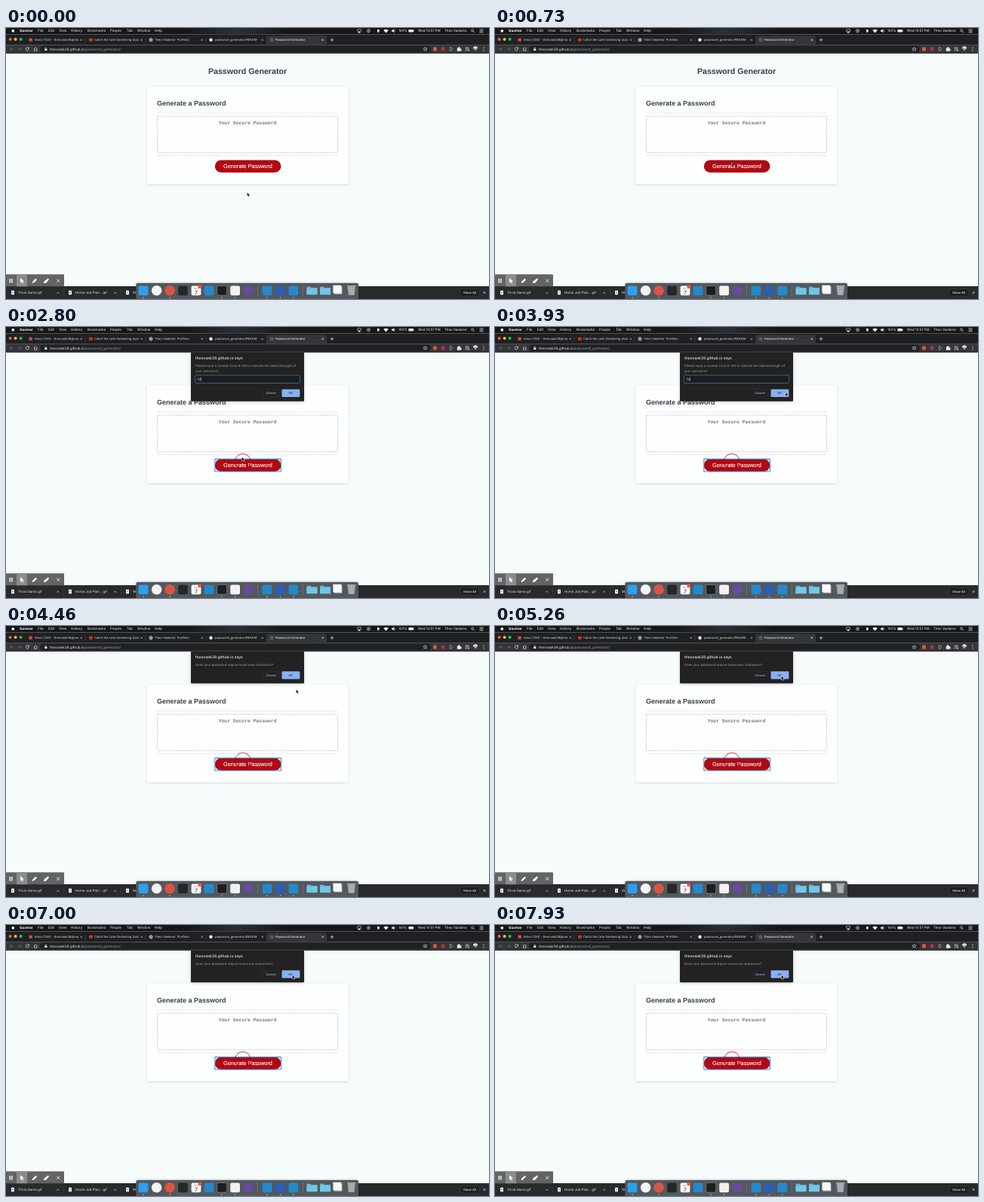
Recreate the animation shown at these times as an HTML page. Size 640 px wide and 360 px high, loop 8000 ms.

```html
<!DOCTYPE html>
<html lang="en">
<head>
<meta charset="utf-8">
<title>Password Generator</title>
<style>
  html, body { margin: 0; width: 100%; height: 100%; overflow: hidden; background: #f6fbfc; }
  svg { display: block; width: 640px; height: 360px; }
  text { font-family: Inter, "Liberation Sans", sans-serif; text-rendering: geometricPrecision; }
  .page { font-family: "Liberation Sans", Arial, sans-serif; }
  .mono { font-family: "Liberation Mono", "Courier New", monospace; }
  #ring { mix-blend-mode: multiply; }
</style>
</head>
<body>
<svg id="stage" viewBox="0 0 640 360" xmlns="http://www.w3.org/2000/svg"></svg>
<script>
const LOOP = 8000;
const USER = "theovask38";
const HOST = USER + ".github.io";
const OWNER = "Theo Vaskens";
const LIGHT = "#e8eaed", DIM = "#9aa0a6", FADED = "#72757a", SLATE = "#333e46";

const rect = (x, y, w, h, fill, r = 0, extra = "") =>
  `<rect x="${x}" y="${y}" width="${w}" height="${h}" rx="${r}" fill="${fill}" ${extra}/>`;
const dot = (x, y, r, fill, extra = "") =>
  `<circle cx="${x}" cy="${y}" r="${r}" fill="${fill}" ${extra}/>`;
const line = (d, color, w = 0.7, extra = "") =>
  `<path d="${d}" fill="none" stroke="${color}" stroke-width="${w}" ${extra}/>`;
const shape = (d, fill, extra = "") => `<path d="${d}" fill="${fill}" ${extra}/>`;
const text = (x, y, size, fill, str, extra = "") =>
  `<text x="${x}" y="${y}" font-size="${size}" fill="${fill}" ${extra}>${str}</text>`;
const cross = (x, y, r, color, w) =>
  line(`M${x - r} ${y - r}l${2 * r} ${2 * r}m0 ${-2 * r}l${-2 * r} ${2 * r}`, color, w);
const globe = (x, y, color) =>
  dot(x, y, 2.1, "none", `stroke="${color}" stroke-width=".7"`) +
  line(`M${x - 2} ${y}h4M${x} ${y - 2}v4`, color, 0.6);
const MIDDLE = 'text-anchor="middle"', BOLD = 'font-weight="700"', MEDIUM = 'font-weight="500"';

function menuBar() {
  const items = [["File", 42], ["Edit", 56], ["View", 70], ["History", 86], ["Bookmarks", 108],
    ["People", 138], ["Tab", 160], ["Window", 174], ["Help", 197]];
  return rect(0, 0, 640, 8.5, "#171718") + rect(240, 0, 130, 8.5, "url(#glow)") +
    dot(9.3, 3.8, 1.9, "#f0f0f0") +
    text(18, 5.4, 4.5, "#fff", "Quomar", BOLD) +
    items.map(([s, x]) => text(x, 5.4, 4.55, "#f2f2f2", s)).join("") +
    rect(465.6, 1.8, 5, 3.2, "none", 0.5, 'stroke="#e6e6e6" stroke-width=".6"') + shape("M468.1 4l1.7 2.4h-3.4z", "#e6e6e6") +
    dot(480.5, 3.8, 2, "none", 'stroke="#e6e6e6" stroke-width=".7"') + dot(480.5, 3.8, 0.8, "#e6e6e6") +
    rect(492, 2, 2.6, 3.6, "#e6e6e6") +
    shape("M503.5 6.4l-3.3 -3.4q3.3 -2.6 6.6 0z", "#f2f2f2") +
    shape("M511 2.8h1.5l1.8 -1.5v5l-1.8 -1.5h-1.5z", "#f2f2f2") +
    line("M515.4 2.4q1 1.4 0 2.8", "#f2f2f2", 0.5) +
    text(520, 5.4, 4.35, "#f2f2f2", "100%") +
    rect(533.4, 2, 6.4, 3.6, "#f2f2f2", 0.8) + rect(540.2, 3.1, 0.7, 1.4, "#f2f2f2") +
    text(546, 5.4, 4.5, "#f2f2f2", "Wed 10:51 PM") +
    text(581, 5.4, 4.45, "#f2f2f2", OWNER) +
    dot(618, 3.3, 1.5, "none", 'stroke="#f2f2f2" stroke-width=".6"') + line("M619.1 4.4l1.6 1.7", "#f2f2f2") +
    line("M627.5 2h5M627.5 3.9h5M627.5 5.8h5", "#f2f2f2", 0.7);
}

function tabStrip() {
  const titles = [`Inbox (124) - ${USER}@ma`, "Catch the Late Gardening Quiz", `${OWNER}' Portfolio`,
    "password_generator/READM", "Password Generator"];
  const icons = [rect(30.5, 13.7, 4.4, 4, "#d94a3d"), rect(110, 13.7, 4.8, 4, "#e02a20", 0.8), globe(192, 15.8, "#fff"),
    dot(271.5, 15.8, 2.2, "#f0f0f0"), globe(352, 15.8, FADED)];
  const starts = [38, 117, 197, 277, 357];
  let out = rect(0, 8.5, 640, 14, "#1f2023") +
    shape("M343 22.5q2 0 2 -2v-7.5q0 -2.5 2.5 -2.5h75q2.5 0 2.5 2.5v7.5q0 2 2 2z", "#35363a");
  ["#f25f57", "#f6bd2f", "#2ac640"].forEach((c, i) => out += dot(5.6 + i * 7, 15, 2, c));
  titles.forEach((s, i) => {
    const x = 25 + i * 80, on = i === 4;
    out += `<clipPath id="tab${i}"><rect x="${x}" y="9" width="71.5" height="13"/></clipPath>` + icons[i] +
      text(starts[i], 17.4, 4.1, on ? "#fff" : "#d5d8dc", s, `clip-path="url(#tab${i})"`) +
      cross(x + 74.7, 15.8, 1.2, on ? "#fff" : "#c4c7cb", 0.6);
    if (i < 3) out += line(`M${x + 80} 13v6`, "#55585c", 0.5);
  });
  return out + line("M429.8 15.8h4.4M432 13.6v4.4", LIGHT, 0.7);
}

function toolbar() {
  return rect(0, 22.3, 640, 11.7, "#35363a") +
    rect(45, 23.6, 518, 8.6, "#202124", 4.3) +
    line("M10 28h-4.4m2 -2l-2 2l2 2M16 28h4.4m-2 -2l2 2l-2 2", FADED) +
    line("M30 26.6a2 2 0 1 0 .3 1.8", LIGHT) + shape("M30.9 25.4v2.2h-2.2z", LIGHT) +
    line("M36.9 28l2.3 -2l2.3 2M37.6 27.6v2.6h3.2v-2.6", LIGHT) +
    rect(51.2, 27.4, 3.2, 2.6, LIGHT, 0.3) + line("M51.9 27.5v-.8a.9 .9 0 0 1 1.8 0v.8", LIGHT, 0.5) +
    text(58, 29.6, 4.65, DIM, `<tspan fill="${LIGHT}">${HOST}</tspan>/password_generator/`) +
    line("M555.5 25.4l.8 1.7h1.9l-1.5 1.2l.5 1.9l-1.7 -1.1l-1.7 1.1l.5 -1.9l-1.5 -1.2h1.9z", LIGHT, 0.6) +
    rect(566, 25.6, 4.8, 4.8, "#e0583a", 0.8) +
    rect(576.8, 25.6, 4.6, 4.6, "#b5343c", 0.8) +
    line("M588.3 25.7h1.6l2 2.2l-2 2.2h-1.6z", "#b9c4c2") +
    shape("M597.8 26.6h1.4q-.2 -1.5 1 -1.5t1 1.5h1.4v1.4q1.3 0 1.3 .9t-1.3 .9v1h-4.8z", LIGHT) +
    line("M608.6 26h5M608.6 27.8h5M608.6 29.6h2.6", LIGHT) + dot(613, 29.6, 0.9, LIGHT) +
    dot(622, 28, 3.1, "#30353a") + shape("M618.9 27.4a3.1 3.1 0 0 1 6.2 0z", "#dfe3e5") + rect(620.5, 27.4, 3, 2.4, "#a9adb0", 1) +
    [25.9, 28, 30.1].map(y => dot(633, y, 0.6, LIGHT)).join("");
}

function page() {
  return rect(0, 34, 640, 310, "#f6fbfc") +
    text(320, 61, 10.67, SLATE, "Password Generator", `class="page" ${MIDDLE} ${BOLD}`) +
    rect(186.5, 77.8, 267, 129.6, "#fdfefe", 2, 'filter="url(#shadow)"') +
    text(200, 103.1, 9, SLATE, "Generate a Password", `class="page" ${BOLD}`) +
    line("M200 112.8h240M200 169.6h240", "#dfe4e6", 0.7) +
    rect(200.4, 117.2, 239.2, 48.5, "none", 1, 'stroke="#aeb6ba" stroke-width=".7" stroke-dasharray="2 1.3"') +
    text(320, 128.3, 6.4, "#74787a", "Your Secure Password", `class="mono" ${MIDDLE} ${BOLD}`) +
    rect(276.8, 175.4, 87.6, 16.6, "#b00912", 8.3) +
    text(320.5, 186.2, 7.35, "#fff", "Generate Password", `class="page" ${MIDDLE} stroke="#fff" stroke-width=".12"`) +
    `<g id="focus">${rect(276.8, 175.4, 87.6, 16.6, "none", 0.6, 'stroke="#3a89d6" stroke-width="1.1"')}</g>` +
    '<circle id="ring" cx="313.8" cy="178.6" fill="none" stroke="#ee7075" stroke-width="1.1"/>';
}

function buttons(y) {
  return rect(340.5, y, 21, 10.3, "none", 1.3, 'stroke="#2f3136" stroke-width=".6"') +
    text(351, y + 6.5, 4, "#9cc0fa", "Cancel", `${MIDDLE} ${MEDIUM}`) +
    rect(365.5, y, 23.9, 10.3, "#8ab0f4", 1.3) +
    text(377.2, y + 6.5, 4, "#202a3c", "OK", `${MIDDLE} ${MEDIUM}`);
}

function dialog(id, height, lines, field = "") {
  return `<g id="${id}">` +
    rect(245, 33.5, 150, height, "#202124", 1, 'filter="url(#soft)"') +
    text(251, 43.2, 5, LIGHT, HOST + " says", MEDIUM) +
    lines.map((s, i) => text(251, 53 + i * 6.8, 4.25, DIM, s, i ? "" : `id="${id}Msg"`)).join("") +
    field + buttons(height + 33.5 - 16) + "</g>";
}

function dialogs() {
  const field = rect(250.6, 64.1, 138.8, 10.4, "#1b1c1f", 0.8, 'stroke="#3d7b99" stroke-width=".75"') +
    text(253.2, 71, 4.25, LIGHT, "", 'id="typed"') + rect(0, 66.8, 0.5, 5, LIGHT, 0, 'id="caret"');
  return dialog("prompt", 65.3,
      ["Please input a number from 8-128 to indicate the desired length of", "your password."], field) +
    dialog("confirm", 42.8, [""]);
}

function recorder() {
  return rect(-2, 327.2, 79, 16, "#636465", 1) + rect(14, 327.6, 14, 15.6, "#8b8c8d") +
    rect(4.6, 333, 1.4, 5.6, "#fff") + rect(7.2, 333, 1.4, 5.6, "#fff") +
    shape("M19 332.2l5 4.4l-2.2 .2l1.3 2.4l-1 .5l-1.2 -2.4l-1.9 1.5z", "#fff") +
    shape("M34.6 339l.5 -2l4.3 -4.2l1.6 1.6l-4.3 4.2z", "#fff") +
    shape("M50 338.8q0 -3 3 -4l2.8 -2.2l1.2 1.5l-2.4 2.9q-1.6 2.4 -4.6 1.8z", "#fff") +
    cross(69.3, 335.8, 2.1, "#fff", 0.8);
}

function downloads() {
  const names = ["Trivia Game.gif", "Home Job Plan....gif", "Word List.gif"];
  let out = rect(0, 343, 640, 17, "#292a2d");
  names.forEach((s, i) => {
    const x = i * 76;
    out += rect(x + 7, 348.8, 4, 5.4, "#f1f3f4", 0.4) + rect(x + 8, 350.6, 2, 1.7, "#7f9fc8") +
      text(x + 16, 353.2, 4.4, LIGHT, s) +
      line(`M${x + 67.2} 352.6l1.6 -1.6l1.6 1.6`, LIGHT) + line(`M${x + 76.3} 347v9.5`, "#4a4c50", 0.5);
  });
  return out + rect(602, 346.6, 25, 9.8, "#1f2023", 1.2, 'stroke="#404247" stroke-width=".5"') +
    text(614.5, 353.1, 4.1, LIGHT, "Show All", `${MIDDLE} ${MEDIUM}`) + cross(634, 351.5, 1.4, LIGHT, 0.7);
}

function dock() {
  const app = (x, c) => rect(x - 6.4, 342.4, 12.8, 12.8, c, 2.2);
  const disc = (x, c) => dot(x, 348.8, 6.8, c);
  const folder = x => shape(`M${x - 7} 343.8h5l1.2 1.3h7.8v9h-14z`, "#62b8dc") + rect(x - 7, 346.2, 14, 8, "#74c6e6", 0.7);
  return rect(172.3, 338.8, 294.7, 24, "#53595d", 2.5, 'filter="url(#soft)"') +
    app(182, "#2c9ff0") + disc(199.6, "#f4f3f6") + disc(217, "#dc5443") + app(234.5, "#25272b") +
    app(252, "#f8f8f8") + text(252, 347, 2.8, "#df3a32", "OCT", MIDDLE) + text(252, 353.8, 7, "#333", "7", MIDDLE) +
    dot(257, 343.6, 2.5, "#f03c34") + text(257, 344.8, 3.2, "#fff", "1", MIDDLE) +
    app(269, "#2489ca") +
    rect(279.8, 342.5, 12.8, 12.6, "#1d1e20", 2, 'stroke="#9a9da0" stroke-width=".5"') +
    app(303.6, "#f3f1f4") + disc(321, "#6a4a9c") +
    app(346, "#2489ca") + app(363.4, "#2c5fb4") + app(380.8, "#2489ca") +
    line("M333.5 342v14M393.3 342v14", "#7d8386", 0.6) +
    folder(405.5) + folder(423) +
    rect(434.5, 343.2, 10.8, 10.2, "#d5d9dc", 0.5) + rect(433.4, 341.8, 10.8, 10.2, "#f8f9f9", 0.5) +
    shape("M452.3 342.5h10.8l-1.3 12.6h-8.2z", "#a9afb2", 'opacity=".8"') +
    line("M452 342.6h11.4M455.2 344l.6 10M457.7 344v10M460.2 344l-.6 10", "#d6dadc", 0.6) +
    [182, 217, 286, 303.6, 346, 363.4, 380.8].map(x => dot(x, 358.2, 0.65, "#e2e4e5")).join("");
}

const shadow = (id, dy, blur, alpha) =>
  `<filter id="${id}" x="-10%" y="-30%" width="120%" height="160%">` +
  `<feDropShadow dx="0" dy="${dy}" stdDeviation="${blur}" flood-opacity="${alpha}"/></filter>`;
const defs = "<defs>" + shadow("shadow", 0.7, 1.3, 0.2) + shadow("soft", 0.8, 2, 0.18) +
  '<linearGradient id="glow"><stop stop-color="#2b3036" stop-opacity="0"/><stop offset=".5" stop-color="#2b3036"/>' +
  '<stop offset="1" stop-color="#2b3036" stop-opacity="0"/></linearGradient></defs>';

const cursor = '<path id="cursor" d="M0 0v5.2l1.3 -1.1l.9 2l1 -.45l-.9 -1.95h1.6z" fill="#000" stroke="#fff" stroke-width=".45" stroke-linejoin="round"/>';

document.getElementById("stage").innerHTML = defs +
  page() + dialogs() + menuBar() + tabStrip() + toolbar() + downloads() + recorder() + dock() + cursor;

const $ = id => document.getElementById(id);
const show = (id, on) => $(id).setAttribute("visibility", on ? "visible" : "hidden");

// Cursor stops: time, x, y
const path = [[0, 319.5, 218.5], [350, 319.5, 218.5], [850, 312.6, 172.8], [3050, 312.6, 172.8],
  [3700, 385, 86.8], [4350, 385, 86.8], [4850, 379.4, 66.4], [LOOP, 379.4, 66.4]];
const CLICK = 950, OPEN = 1070;
const questions = [[4280, "lowercase"], [5580, "uppercase"], [6900, "numerical"]];

function cursorAt(t) {
  const i = path.findIndex(p => p[0] > t);
  const [t0, x0, y0] = path[i - 1], [t1, x1, y1] = path[i];
  const u = (t - t0) / (t1 - t0), e = u * u * (3 - 2 * u);
  return [x0 + (x1 - x0) * e, y0 + (y1 - y0) * e];
}

function render(t) {
  const [x, y] = cursorAt(t);
  $("cursor").setAttribute("transform", `translate(${x} ${y})`);

  show("focus", t >= CLICK);
  show("ring", t >= CLICK);
  $("ring").setAttribute("r", 10.2 * Math.min(1, Math.max(0, (t - CLICK) / 120)));

  const asked = questions.filter(q => t >= q[0]).pop();
  const prompting = t >= OPEN && !asked;
  show("prompt", prompting);
  show("confirm", !!asked);
  if (asked) $("confirmMsg").textContent = `Does your password require ${asked[1]} characters?`;

  const typed = "72".slice(0, t < 2000 ? 0 : t < 2200 ? 1 : 2);
  $("typed").textContent = typed;
  $("caret").setAttribute("x", 253.3 + typed.length * 2.55);
  show("caret", prompting && t % 1000 >= 500);
}

function tick() {
  render(performance.now() % LOOP);
  requestAnimationFrame(tick);
}
tick();
</script>
</body>
</html>
```
